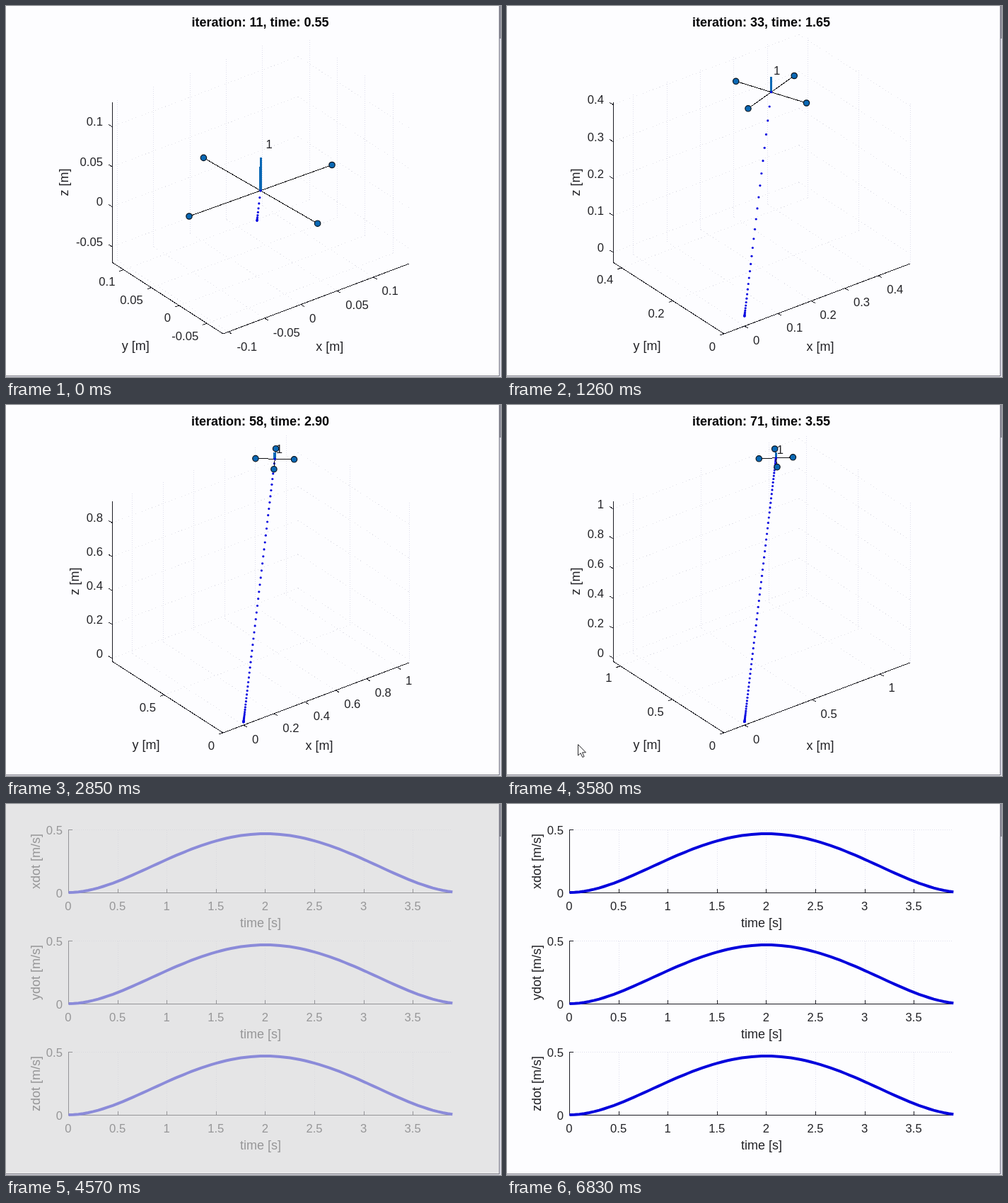
Write an HTML page that moves like this. It is 700 px wide and 524 px high and loops after 6.9 s.

```html
<!DOCTYPE html>
<html lang="en">
<head>
<meta charset="utf-8">
<title>Quadrotor trajectory</title>
<style>
  html, body { margin: 0; width: 100%; height: 100%; overflow: hidden; background: #fdfdff; }
  svg { display: block; width: 100%; height: 100%; }
  text { font: 16.67px "Liberation Sans", Arial, sans-serif; fill: #222226; }
  line { shape-rendering: crispEdges; }
  .label { font-size: 18px; }
  .title { font-size: 18px; font-weight: bold; fill: #060608; }
  .axis { stroke: #1c1c24; fill: none; }
  .grid { stroke: #dedeec; stroke-dasharray: 1 2; fill: none; }
  .faint { stroke: #e2e2ea; stroke-dasharray: 1 4; fill: none; }
  .arm { stroke: #101014; }
  .rod { stroke: #0a68b4; stroke-width: 3.4; }
  .rotor { fill: #0a68b4; stroke: #08121c; stroke-width: 1.2; }
  .dot { fill: #0a0ae0; }
  .curve { stroke: #0404dc; stroke-width: 4; fill: none; }
</style>
</head>
<body>
<svg id="stage" viewBox="0 0 700 524" preserveAspectRatio="none"></svg>
<script>
const stage = document.getElementById('stage');
const LOOP = 6900, START = 130, STEP = 730 / 11;
const DT = 0.05, LAST = 78, ARM = 0.1, ROD = 0.04, GRAVITY = 9.81, LAG = 0.1;
const FADE_OUT = 3980, FADE_MID = 4370, FADE_IN = 4760;

// [step, iteration]
const PACE = [[-2, 11], [17, 33], [31, 47], [52, 71], [58, LAST]];

// Plot box on screen: front corner and its three edges.
const CORNER = [307, 463];
const EDGES = [[263, -99], [-157, -101], [0, -226]];
const MIN_GAP = [45, 45, 35];

const n = v => v.toFixed(1);
const line = (a, b, cls) =>
  `<line class="${cls}" x1="${n(a[0])}" y1="${n(a[1])}" x2="${n(b[0])}" y2="${n(b[1])}"/>`;
const circle = (p, r, cls) => `<circle class="${cls}" cx="${n(p[0])}" cy="${n(p[1])}" r="${r}"/>`;
const text = (x, y, s, anchor = 'middle', cls = '') =>
  `<text class="${cls}" x="${n(x)}" y="${n(y + 6)}" text-anchor="${anchor}">${s}</text>`;
const upright = (x, y, s) =>
  `<text class="label" transform="translate(${n(x + 5)} ${y}) rotate(-90)" text-anchor="middle">${s}</text>`;
const shift = (p, dx, dy) => [p[0] + dx, p[1] + dy];

// Minimum-jerk move of 1 m in 4 s.
const place = t => { const k = t / 4; return k ** 3 * (10 - 15 * k + 6 * k * k); };
const speed = t => { const k = t / 4; return 7.5 * k * k * (1 - k) ** 2; };
const accel = t => { const k = t / 4; return 3.75 * k * (1 - k) * (1 - 2 * k); };

function iterationAt(step) {
  for (let i = 1; i < PACE.length; i++) {
    const [s0, v0] = PACE[i - 1], [s1, v1] = PACE[i];
    if (step <= s1) return Math.round(v0 + (v1 - v0) * (step - s0) / (s1 - s0));
  }
  return LAST;
}

function limitsFor(p) {
  const reach = ARM * Math.max(Math.cos(p), Math.sin(p));
  const lo = Math.min(0, p - reach), size = p + reach - lo;
  const mid = lo + size / 2, half = 0.6408 * size;
  const zMid = (p + ROD) / 2;
  return [[mid - half, mid + half], [lo, lo + size], [zMid - size / 2, zMid + size / 2]];
}

function ticksFor([lo, hi], edge, gap) {
  const pxPerUnit = Math.hypot(...edge) / (hi - lo);
  const unit = [0.01, 0.02, 0.05, 0.1, 0.2, 0.5, 1].find(u => u * pxPerUnit >= gap);
  const out = [];
  for (let i = Math.ceil(lo / unit - 0.01); i * unit <= hi + 1e-6; i++) out.push(+(i * unit).toFixed(2) + 0);
  return out;
}

const labelWidth = s => [...s].reduce((w, c) => w + (c === '.' ? 0.278 : c === '-' ? 0.333 : 0.556), 0) * 16.67;
const extraWidth = ticks => Math.max(...ticks.map(v => labelWidth(String(v)))) - 23.2;

function flight(iteration) {
  const time = iteration * DT, p = place(time);
  const limits = limitsFor(p);
  const unit = (axis, v) => (v - limits[axis][0]) / (limits[axis][1] - limits[axis][0]);
  const box = (...uvw) => [0, 1].map(i => CORNER[i] + uvw.reduce((sum, f, a) => sum + f * EDGES[a][i], 0));
  const at = (x, y, z) => box(unit(0, x), unit(1, y), unit(2, z));
  const [xs, ys, zs] = limits.map((l, a) => ticksFor(l, EDGES[a], MIN_GAP[a]));
  let grid = '', axes = '', body = '';

  for (const v of xs) {
    const u = unit(0, v), q = box(u, 0, 0);
    grid += line(box(u, 1, 0), box(u, 1, 1), 'grid') + line(q, box(u, 1, 0), 'faint');
    axes += line(q, shift(q, 5, 3), 'axis') + text(q[0] + 12, q[1] + 20.5 - 2 * u, v, 'start');
  }
  for (const v of ys) {
    const u = unit(1, v), q = box(0, u, 0);
    grid += line(box(1, u, 0), box(1, u, 1), 'grid') + line(q, box(1, u, 0), 'faint');
    axes += line(q, shift(q, -6, 2), 'axis') + text(q[0] - 12, q[1] + 18 - 2 * u, v, 'end');
  }
  for (const v of zs) {
    const u = unit(2, v), q = box(0, 1, u);
    grid += line(q, box(1, 1, u), 'faint') + line(box(1, 1, u), box(1, 0, u), 'faint');
    axes += line(q, shift(q, -5, -3), 'axis') + text(137, q[1] - 7, v, 'end');
  }
  axes += line(box(0, 0, 0), box(1, 0, 0), 'axis') + line(box(0, 0, 0), box(0, 1, 0), 'axis')
    + line(box(0, 1, 0), box(0, 1, 1), 'axis')
    + text(443 + extraWidth(xs), 481, 'x [m]', 'middle', 'label')
    + text(198 - extraWidth(ys), 480, 'y [m]', 'middle', 'label')
    + upright(98 - extraWidth(zs), 249, 'z [m]');

  for (let k = 0; k <= iteration; k++) {
    const s = place(k * DT);
    body += circle(at(s, s, s), 1.6, 'dot');
  }
  const tilt = accel(time - LAG) / GRAVITY, c = Math.cos(p), s = Math.sin(p);
  const tip = (dx, dy) => at(p + ARM * dx, p + ARM * dy, p - ARM * tilt * (dx + dy));
  const tips = [tip(c, s), tip(-c, -s), tip(-s, c), tip(s, -c)];
  const top = at(p + ROD * tilt, p + ROD * tilt, p + ROD);
  const tag = at(p + 0.0072, p, p + 0.0558);
  body += line(tips[0], tips[1], 'arm') + line(tips[2], tips[3], 'arm')
    + line(at(p, p, p), top, 'rod') + tips.map(q => circle(q, 4.2, 'rotor')).join('')
    + circle(at(p, p, p), 1.6, 'dot') + text(tag[0], tag[1], 1, 'start');

  return grid + axes + body
    + text(359.5, 23, `iteration: ${iteration}, time: ${time.toFixed(2)}`, 'middle', 'title');
}

function speedPlot(name, base) {
  const X = t => 88.5 + t * 139.2, Y = v => base - v * 177;
  let out = line([88, Y(0.5)], [631, Y(0.5)], 'grid'), curve = '';
  for (let t = 0; t <= 3.5; t += 0.5) {
    if (t) out += line([X(t), Y(0.5)], [X(t), base], 'grid');
    out += line([X(t), base], [X(t), base - 5], 'axis') + text(X(t) - 0.5, base + 19, t);
  }
  for (let t = 0; t <= 3.901; t += DT) curve += `${n(X(t))},${n(Y(speed(t)))} `;
  return out + line([88, base], [631, base], 'axis') + line([88.5, base], [88.5, Y(0.5)], 'axis')
    + line([88, Y(0.5)], [94, Y(0.5)], 'axis')
    + text(80, base + 1, 0, 'end') + text(80, Y(0.5) + 0.5, 0.5, 'end')
    + text(360, base + 43, 'time [s]', 'middle', 'label')
    + upright(43, base - 44, `${name}dot [m/s]`)
    + `<polyline class="curve" points="${curve}"/>`;
}
const plots = speedPlot('x', 125) + speedPlot('y', 282) + speedPlot('z', 439);

function pointer(t) {
  if (t < 3440 || t >= 3780) return '';
  const k = Math.min(1, (t - 3440) / 130);
  return `<path transform="translate(${n(58 + 42.5 * k)} ${n(496 - 16.5 * k)})" fill="#fff" stroke="#2a2a2e"
    d="M0 0V15.5L3.6 12.2 6.3 18 8.6 17 6 11.3H11Z"/>`;
}

const frame = `<rect x="698" width="2" height="524" fill="#d6d6e2"/>
  <rect x="698" width="2" height="46" fill="#8e8e9a"/>
  <rect y="523" width="700" height="1" fill="#e6e6ee"/>
  <rect x="697" width="1" height="523" fill="#80808c"/>
  <rect y="522" width="698" height="1" fill="#74747e"/>`;

function draw(step) {
  const t = step < 0 ? 0 : START + step * STEP;
  const veil = t < FADE_MID ? (t - FADE_OUT) / (FADE_MID - FADE_OUT) : (FADE_IN - t) / (FADE_IN - FADE_MID);
  const scene = t < FADE_MID ? flight(iterationAt(step)) + pointer(t) : plots;
  const cover = veil > 0
    ? `<rect width="700" height="524" fill="#d8d8d8" fill-opacity="${Math.min(1, veil).toFixed(3)}"/>` : '';
  stage.innerHTML = '<rect width="700" height="524" fill="#fdfdff"/>' + scene + cover + frame;
}

let begin = null, shown = null;
function tick(now) {
  if (begin === null) begin = now;
  const t = (now - begin) % LOOP;
  const step = t < START ? -2 : Math.floor((t - START + 3) / STEP);
  if (step !== shown) draw(shown = step);
  requestAnimationFrame(tick);
}
draw(-2);
requestAnimationFrame(tick);
</script>
</body>
</html>
```
